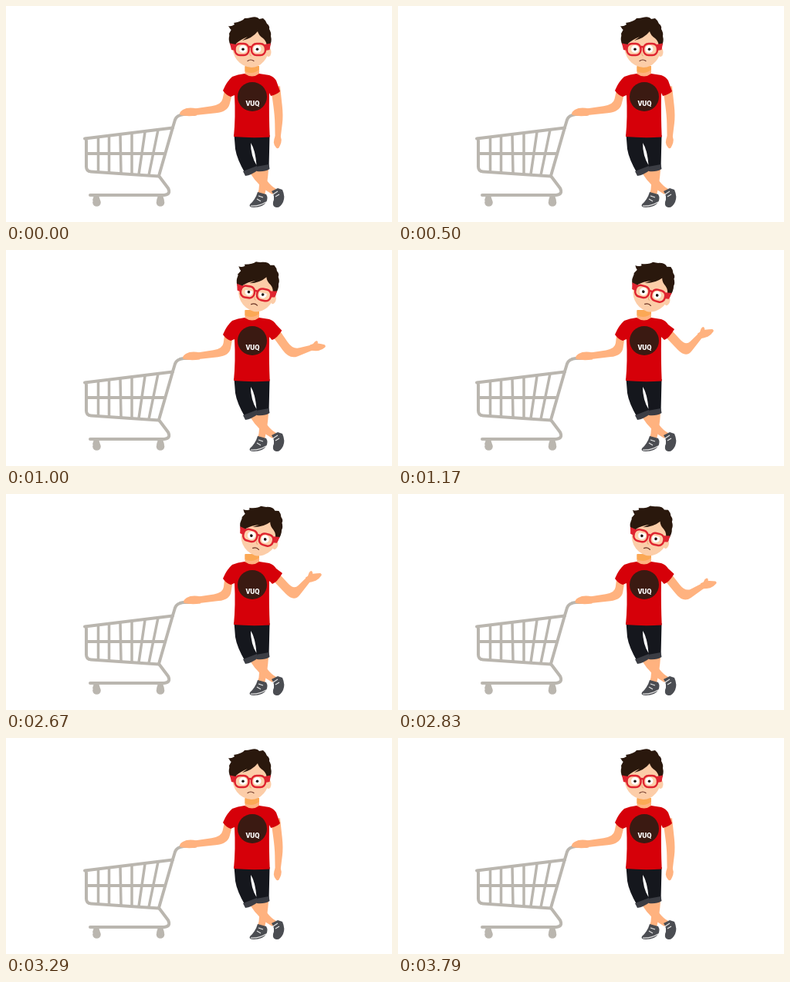
An HTML page that plays this animation: 500x281 px, repeating every 3830 ms.

```html
<!DOCTYPE html>
<html lang="en">
<head>
<meta charset="utf-8">
<title>Shopper with cart</title>
<style>
  html, body { margin: 0; width: 100%; height: 100%; overflow: hidden; background: #fff; }
  svg { display: block; width: 100vw; height: 100vh; }
  .cart { fill: none; stroke: #bab6af; stroke-width: 4; stroke-linecap: round; stroke-linejoin: round; }
  .skin { fill: #ffb27f; }
  .face { fill: #fccda8; }
  .hair { fill: #2a180d; }
  .cloth { fill: #15171d; }
  .cuff { fill: #3b3d44; }
  .shoe { fill: #4b4d52; }
  .lace { fill: none; stroke: #e8e8e8; stroke-width: 1.1; }
  .badge { font: 900 9px Roboto, Arial, sans-serif; fill: #fff; text-anchor: middle; }
</style>
</head>
<body>
<svg viewBox="0 0 500 281">
  <g class="cart">
    <path d="M244 141H230Q221 142 219 148L216 158L198 221L210 237Q214 245 205 246H109"/>
    <path d="M102 172.500L216 158.500M104 173V209Q104 215 110 215.500L198 221.500M105 192H206"/>
    <path stroke-width="3.500" d="M119.500 171V215M133.500 169V216M148 167L149 217M163 166V218M180 164L172 219M197 161L185 220"/>
  </g>
  <g fill="#bab6af">
    <path d="M114 246H120L122 253H112ZM197 246H203L205 253H195Z"/>
    <circle cx="117.500" cy="255.500" r="5.300"/>
    <circle cx="200" cy="255.500" r="5.300"/>
  </g>

  <path class="skin" d="M326 212H340Q339 230 335 246L326 244Q330 233 326 222Z"/>
  <path class="skin" d="M316 217L330 211Q337 231 350 238L345 245Q327 235 316 217Z"/>
  <path class="shoe" d="M326 242L337 245Q340 250 337 255Q333 262 321 262Q314 262 316 258Q323 252 326 242Z"/>
  <path class="shoe" d="M344 241L352 237L358 239Q362 248 359 255Q355 263 350 262Q345 261 346 255Q349 248 344 241Z"/>
  <path class="lace" d="M327 247L333 249M325 251L330 254M346 245L352 241M349 248L354 245M317 260Q327 261 337 255"/>

  <path class="cloth" d="M316 168H341.500L340.500 211L326 214Q321 196 316 180Z"/>
  <path class="cuff" d="M324 209L340.500 206L341.500 212Q335 216 325 215Z"/>
  <path class="cloth" d="M295.500 167H320Q318 190 326 211L310 218Q299 199 297 186Z"/>
  <path class="cuff" d="M307 215L325 208L327 213Q318 220 310 221Z"/>
  <path d="M317 178Q323 187 324.500 207Q317 195 317 178Z" fill="#fff"/>

  <path class="skin" id="restArm"/>
  <path class="skin" id="restHand" d="M247 133.500Q236 131 229 135Q223 139 226 142Q235 144 247 142.500Z"/>
  <path class="skin" id="arm"/>
  <g id="hand" class="skin">
    <path d="M-3 -3.500Q3 -5.500 8 -4.500Q13 -3.500 17 -2Q19 0 17 1.500Q13 4.500 8 5Q2 5 -3 3.500Z"/>
    <path id="thumb" d="M0 -3Q4 -9.500 7 -9Q9 -8 7 -3Z"/>
  </g>
  <path class="skin" d="M309.500 79H328V90Q319 96 309.500 90Z"/>
  <path fill="#fba855" d="M309.500 78H328V83Q319 90 309.500 85Z"/>
  <path id="shirt" fill="#d60009"/>
  <circle cx="319" cy="118" r="19" fill="#3b1a12"/>
  <text class="badge" x="319.500" y="130">VUQ</text>

  <g id="head">
    <path class="hair" d="M289 36Q297 18 318 20Q342 24 342 56L292 52Z"/>
    <ellipse class="face" cx="340" cy="60" rx="3.500" ry="6"/>
    <path class="face" d="M293 50Q297 31 319 30Q338 33 341 50Q341 64 334 72Q327 80 318 80Q306 79 299 70Q293 62 293 50Z"/>
    <path class="hair" d="M288 26Q292 27 296 24L295 22Q306 20 309 16Q314 16 317 15Q325 13 328 17L333 16Q337 19 338 23Q342 26 341 30Q344 35 343 39Q345 46 341 54L338 54Q338 46 333 42Q327 38 326 33Q319 42 306 45L313 40Q303 44 298 49L297 53L291 51Q287 44 290 37Q292 34 293 32Q290 30 288 26Z"/>
    <g id="eyes"></g>
    <path d="M298 50L290 48.500L292 57L297 58ZM335 50L343 48.500L341.500 57L336 58Z" fill="#df2430"/>
    <path d="M314 54Q316 52 318 54" fill="none" stroke="#df2430" stroke-width="2.400"/>
    <path d="M316 61Q315 65 318 65" fill="none" stroke="#e9a878" stroke-width="1"/>
    <path d="M313 71.500Q317 68.500 321 71.500" fill="none" stroke="#6b3526" stroke-width="1.200" stroke-linecap="round"/>
  </g>
</svg>
<script>
const LOOP = 3830, RISE_START = 600, RISE_END = 1170, MIRROR = 1920, FPS = 24;
const $ = id => document.getElementById(id);
const mix = (a, b, p) => a + (b - a) * p;
const mixPoint = (a, b, p) => [mix(a[0], b[0], p), mix(a[1], b[1], p)];
const polar = ([x, y], angle, length) => [x + Math.cos(angle) * length, y + Math.sin(angle) * length];
const heading = (a, b) => Math.atan2(b[1] - a[1], b[0] - a[0]);
const rad = deg => deg * Math.PI / 180;

$('eyes').innerHTML = [[305.5, 307], [327, 325.5]].map(([lens, pupil]) => `
  <rect x="${lens - 9}" y="49" width="18" height="15" rx="6.5" fill="#fcd0ab"/>
  <circle cx="${pupil}" cy="56" r="5" fill="#fff"/>
  <circle cx="${pupil}" cy="56.3" r="1.8" fill="#21130f"/>
  <rect class="lid" x="${pupil - 5.5}" y="50.5" width="11" height="0" fill="#fcd0ab"/>
  <rect x="${lens - 9}" y="49" width="18" height="15" rx="6.5" fill="none" stroke="#df2430" stroke-width="2.5"/>`).join('');
const lids = document.querySelectorAll('.lid');

// Tapered arm outline whose two sides curve around the elbow.
function armPath(shoulder, elbow, wrist, [top, middle, end]) {
  const upper = heading(shoulder, elbow), lower = heading(elbow, wrist);
  const half = (lower - upper) / 2;
  const side = sign => {
    const turn = sign * Math.PI / 2;
    const a = polar(shoulder, upper + turn, top / 2);
    const corner = polar(elbow, upper + half + turn, middle / 2 / Math.cos(half));
    const b = polar(wrist, lower + turn, end / 2);
    return [a, mixPoint(a, corner, 0.65), corner, mixPoint(corner, b, 0.35), b];
  };
  const [a, b, c, d, e] = side(-1), [v, w, x, y, z] = side(1);
  return `M${a}L${b}Q${c} ${d}L${e}L${z}L${y}Q${x} ${w}L${v}Z`;
}

function progress(time) {
  const t = Math.floor(time * FPS / 1000 + 0.01) * 1000 / FPS;
  const forward = MIRROR - Math.abs(t - MIRROR);
  const u = Math.min(1, Math.max(0, (forward - RISE_START) / (RISE_END - RISE_START)));
  return u * u * (3 - 2 * u);
}

function draw(time) {
  const p = progress(time);

  const shoulder = [mix(349, 347, p), 105];
  const elbow = polar(shoulder, rad(mix(83, 47, p)), 38);
  const foreAngle = mix(93, -49, p);
  const wrist = polar(elbow, rad(foreAngle), 29);
  $('arm').setAttribute('d', armPath(shoulder, elbow, wrist, [12, 11, 7]));
  $('hand').setAttribute('transform',
    `translate(${wrist}) rotate(${foreAngle + 28 * p ** 3}) scale(${mix(0.75, 1, p)} 1)`);
  $('thumb').setAttribute('transform', `scale(1 ${mix(0.4, 1, p)})`);

  const shift = 5 * p;
  $('restArm').setAttribute('d',
    armPath([289, 108], [283 + shift * 0.5, 133], [243 + shift, 138], [11, 10, 8.5]));
  $('restHand').setAttribute('transform', `translate(${shift} 0)`);

  const cuffX = mix(355, 358, p), cuffY = mix(111, 103, p);
  $('shirt').setAttribute('d',
    `M309 88Q319 95 328 88L341 90Q347 92 350 97L${cuffX} ${cuffY}Q351 115 ${mix(343, 345, p)} 117` +
    `L341 113Q340.500 145 341.700 170.500Q318 172 295 170Q297.500 145 296 116L291 118Q285 116 281 110Q286 98 293 92Q300 89 309 88Z`);

  const tilt = p ** 1.5;
  $('head').setAttribute('transform', `translate(${3 * tilt} 0) rotate(${15 * tilt} 319 85)`);
  lids.forEach(lid => lid.setAttribute('height', 6.3 * Math.sin(Math.PI * p)));
}

const start = performance.now();
function tick(now) {
  draw(Math.max(0, now - start) % LOOP);
  requestAnimationFrame(tick);
}
draw(0);
requestAnimationFrame(tick);
</script>
</body>
</html>
```
